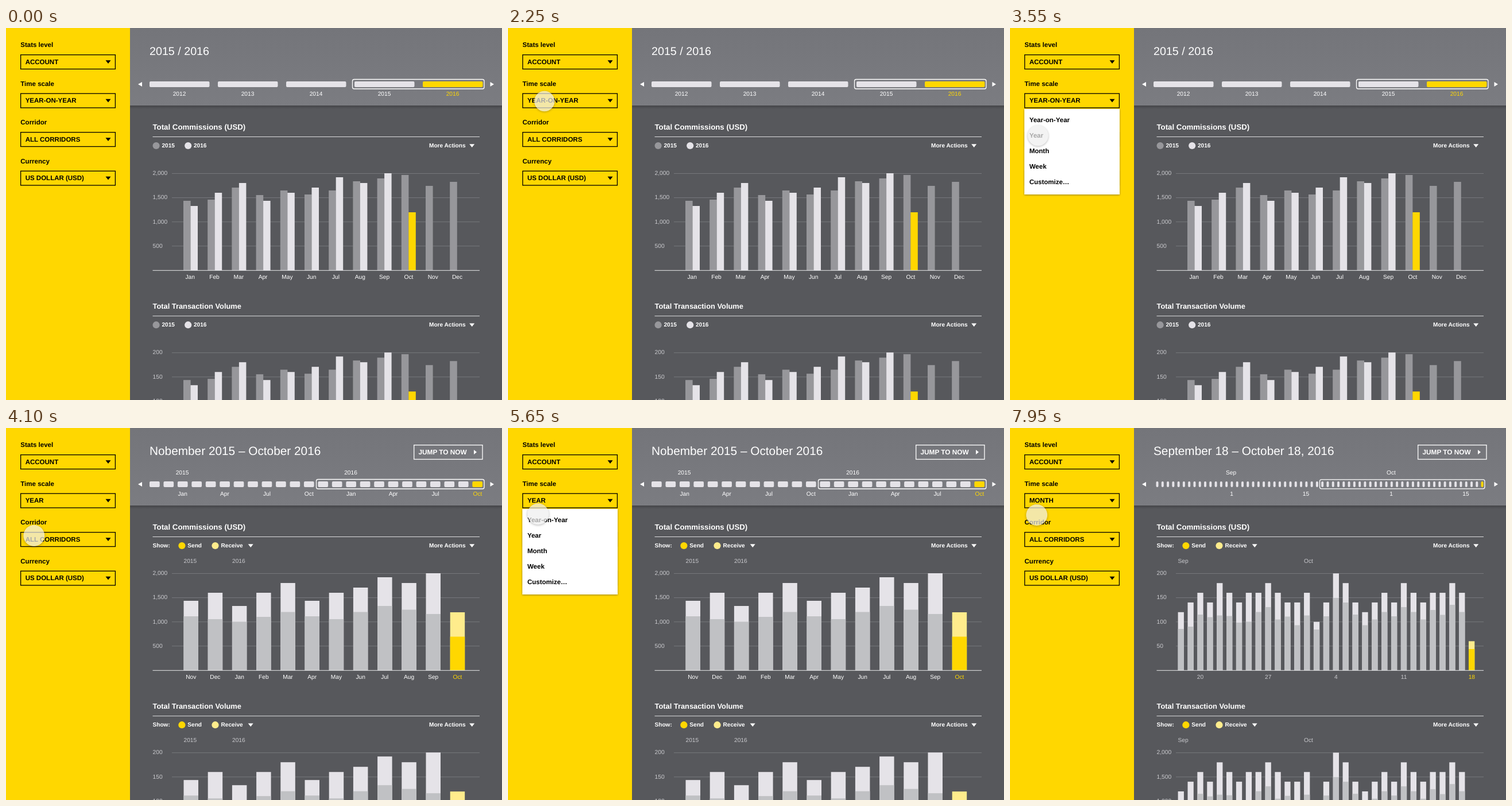
These frames come from a looping animation (864x648 px, 8 s). An HTML page:

```html
<!DOCTYPE html>
<html lang="en">
<head>
<meta charset="utf-8">
<title>Stats dashboard</title>
<style>
html, body { margin: 0; width: 100%; height: 100%; overflow: hidden; background: #57585c; }
svg { position: absolute; left: 0; top: 0; display: block; }
text { font-family: "Liberation Sans", Arial, sans-serif; text-rendering: geometricPrecision; white-space: pre; }
.b { font-weight: bold; }
#menu { position: absolute; left: 25px; top: 141px; width: 165.5px; height: 148.5px; background: #fff; box-shadow: 0 1px 3px rgba(0,0,0,.4); }
#dot { position: absolute; left: -18.5px; top: -18.5px; width: 37px; height: 37px; border-radius: 50%;
  background: rgba(238,238,238,.7); box-shadow: 0 1px 4px rgba(0,0,0,.3); }
</style>
</head>
<body>
<svg id="stage" width="864" height="648"></svg>
<div id="menu"><svg id="items" width="165" height="148"></svg></div>
<div id="dot"></div>
<script>
const YELLOW = '#ffd700', PALE = '#ffec8c', LIGHT = '#e5e3e8', MID = '#c0c1c4', GREY = '#97979b', WHITE = '#fff', DIM = '#c9c9cd';
const MONTHS = 'Jan Feb Mar Apr May Jun Jul Aug Sep Oct Nov Dec'.split(' ');
const $ = id => document.getElementById(id);
const range = (n, f) => Array.from({ length: n }, (_, i) => f(i)).join('');

const text = (x, y, s, size, fill, bold, anchor = 'start') =>
  `<text x="${x}" y="${y}" font-size="${size}" fill="${fill}" text-anchor="${anchor}"${bold ? ' class="b"' : ''}>${s}</text>`;
const bold = (x, y, s, size = 10.1, fill = WHITE) => text(x, y, s, size, fill, true);
const label = (x, y, s, fill = WHITE) => text(x, y, s, 10.2, fill, false, 'middle');
const rect = (x, y, w, h, fill, r = 0) => `<rect x="${x}" y="${y}" width="${w}" height="${h}" rx="${r}" fill="${fill}"/>`;
const frame = (x, y, w, h, color, r = 0) =>
  `<rect x="${x}" y="${y}" width="${w}" height="${h}" rx="${r}" fill="none" stroke="${color}" stroke-width="1.3"/>`;
const line = (x, y, color) => `<path d="M${x} ${y}H825" stroke="${color}"/>`;
const circle = (x, y, fill) => `<circle cx="${x}" cy="${y}" r="6.1" fill="${fill}"/>`;
const down = (x, y, fill = WHITE) => `<path d="M${x} ${y}h9l-4.5 5.8z" fill="${fill}"/>`;
const side = (x, y, w, h) => `<path d="M${x} ${y - h}v${2 * h}l${w} ${-h}z" fill="#fff"/>`;

// Bars standing on the axis at y = 422, given by their top edge
const bar = (x, w, top, fill) => rect(x, top, w, 422 - top, fill);

const timelines = [
  () => range(5, i => rect(250 + 119 * i, 93, 104.5, 10, i == 4 ? YELLOW : LIGHT, 2) +
      label(302 + 119 * i, 118, 2012 + i, i == 4 ? YELLOW : WHITE)) +
    frame(603.5, 89.5, 229.5, 16.5, WHITE, 3),
  () => range(24, i => rect(250 + 24.45 * i, 93, 17.7, 10, i == 23 ? YELLOW : LIGHT, 2)) +
    range(8, i => label(307.6 + 73.4 * i, 118, MONTHS[i * 3 % 12], i == 7 ? YELLOW : WHITE)) +
    label(307, 81, 2015) + label(600.5, 81, 2016) + frame(540.5, 89.5, 292.5, 16.5, WHITE, 3),
  () => range(62, i => rect(254.5 + 9.28 * i, 93, 4, 10, i == 61 ? YELLOW : LIGHT, 2)) +
    label(385, 81, 'Sep') + label(664, 81, 'Oct') +
    [386, 515.5, 664, 794].map((x, i) => label(x, 118, i % 2 ? 15 : 1)).join('') +
    frame(539.5, 89.8, 287.5, 16, WHITE, 3)
];

const older = [301, 299, 278, 291, 283, 290, 283, 267, 262, 256, 275, 268];
const newer = [310, 287, 270, 301, 287, 278, 260, 270, 253, 321];
const total = [301, 287, 310, 287, 270, 301, 287, 278, 260, 270, 253, 321];
const sent = [328, 333, 337.5, 329, 320.5, 328, 333, 320.5, 310, 316.5, 324, 363.5];
// Daily totals in units of 20
const days = [6, 7, 8, 7, 9, 8, 7, 8, 8, 9, 8, 7, 7, 8, 5, 7, 10, 9, 7, 6, 7, 8, 7, 9, 8, 7, 8, 8, 9, 8, 3];
const daySent = [350, 346, 325, 329.5, 326.5, 327.5, 339, 337.5, 320.5, 312, 333.5, 328.5, 343.5, 326.5, 351, 328,
  296, 304, 325, 343.5, 333.5, 320.5, 328, 312, 320.5, 333.5, 317, 325.5, 308, 320.5, 385];

const stacked = (x, w, top, split, last) => bar(x, w, top, last ? PALE : LIGHT) + bar(x, w, split, last ? YELLOW : MID);

const plots = [
  () => older.map((y, i) => bar(309 + 42.2 * i, 12.6, y, GREY)).join('') +
    newer.map((y, i) => bar(321.5 + 42.2 * i, 12.5, y, i == 9 ? YELLOW : LIGHT)).join('') +
    MONTHS.map((m, i) => label(320.7 + 42.3 * i, 437, m)).join(''),
  () => text(309.5, 235, 2015, 10.2, DIM) + text(394, 235, 2016, 10.2, DIM) +
    total.map((y, i) => stacked(309.5 + 42.2 * i, 25.5, y, sent[i], i == 11) +
      label(322.2 + 42.2 * i, 437, MONTHS[(i + 10) % 12], i == 11 ? YELLOW : WHITE)).join(''),
  () => text(292.5, 235, 'Sep', 10.2, DIM) + text(512, 235, 'Oct', 10.2, DIM) +
    days.map((v, i) => stacked(292.6 + 16.88 * i, 10.3, 422 - 16.87 * v, daySent[i], i == 30)).join('') +
    [20, 27, 4, 11, 18].map((d, i) => label(331.5 + 118.2 * i, 437, d, i == 4 ? YELLOW : DIM)).join('')
];

function chart(mode, name, max, dy, size) {
  const legend = mode
    ? bold(255.5, 208, 'Show:') + circle(306.4, 205, YELLOW) + bold(316.3, 208, 'Send') +
      circle(364.5, 205, PALE) + bold(374.5, 208, 'Receive') + down(421.7, 202.3)
    : circle(261.6, 205, GREY) + bold(271.5, 208, 2015) + circle(317.2, 205, LIGHT) + bold(327, 208, 2016);
  const grid = range(4, i => line(289, 253.5 + 42.1 * i, '#77787c') +
    text(255.5, 256.3 + 42.1 * i, (max * (4 - i) / 4).toLocaleString('en-US'), 10.3, DIM));
  return `<g transform="translate(0 ${dy})">` + bold(255.5, 177, name, size) + line(255.5, 189.5, '#dcdcde') + legend +
    bold(737, 208, 'More Actions') + down(807.2, 202.3) + grid + plots[mode]() + line(255.5, 422.3, '#e8e8ea') + '</g>';
}

function scene(mode) {
  const title = ['2015 / 2016', 'Nobember 2015 – October 2016', 'September 18 – October 18, 2016'][mode];
  const value = ['YEAR-ON-YEAR', 'YEAR', 'MONTH'][mode];
  const jump = mode ? frame(710.7, 29.7, 119.3, 24.8, WHITE) + bold(718.5, 45.8, 'JUMP TO NOW', 11.8) + side(815, 42, 5, 4) : '';
  return `<g id="view${mode}">` + text(250, 47, title, mode ? 20.8 : 19.7, WHITE) + jump + timelines[mode]() +
    chart(mode, 'Total Commissions (USD)', mode == 2 ? 200 : 2000, 0, 13.25) +
    chart(mode, 'Total Transaction Volume', mode == 2 ? 2000 : 200, 312.2, 12.85) +
    bold(33.7, 130, value, 11.5, '#000') + '</g>';
}

const fields = [['Stats level', 'ACCOUNT'], ['Time scale', ''], ['Corridor', 'ALL CORRIDORS'], ['Currency', 'US DOLLAR (USD)']];
$('stage').innerHTML =
  `<defs><linearGradient id="head" x2="0" y2="1"><stop stop-color="#74757a"/><stop offset="1" stop-color="#7b7c81"/></linearGradient>
   <linearGradient id="shade" x2="0" y2="1"><stop stop-opacity=".22"/><stop offset="1" stop-opacity="0"/></linearGradient></defs>` +
  rect(216, 0, 648, 648, '#57585c') + rect(216, 135, 648, 6, 'url(#shade)') + rect(216, 0, 648, 135, 'url(#head)') +
  rect(0, 0, 216, 648, YELLOW) + side(237, 98, -7, 4) + side(843.5, 98, 6.5, 4) +
  fields.map(([name, value], i) => {
    const y = 67.5 * i;
    return bold(25.3, 33 + y, name, 11.5, '#000') + frame(25.6, 46.7 + y, 164.8, 24.8, '#000') +
      bold(33.7, 62.5 + y, value, 11.5, '#000') + down(173.5, 56.2 + y, '#000');
  }).join('') + [0, 1, 2].map(scene).join('');
$('items').innerHTML = ['Year-on-Year', 'Year', 'Month', 'Week', 'Customize…']
  .map((s, i) => bold(8.7, 23 + 27 * i, s, 11.5, '#000')).join('');

// Quick start, long soft landing
function ease(t) {
  const curve = (s, a, b) => 3 * (1 - s) * (1 - s) * s * a + 3 * (1 - s) * s * s * b + s * s * s;
  let lo = 0, hi = 1;
  for (let i = 0; i < 20; i++) {
    const s = (lo + hi) / 2;
    if (curve(s, .16, .16) < t) lo = s; else hi = s;
  }
  return curve(lo, .16, 1);
}

// Pointer moves: start time, end point, sideways bow
const moves = [[1200, 63, 127, 0], [2500, 48.3, 187, 0], [4500, 49.8, 126.5, 0], [5550, 49, 213.5, 3], [7650, 45, 127, 0]];
const presses = [2050, 3350, 5130, 6250];

function draw(now) {
  const t = now % 8000;
  const mode = t < 3750 ? 0 : t < 6700 ? 1 : 2;
  for (let i = 0; i < 3; i++) $('view' + i).style.display = i == mode ? '' : 'none';
  $('menu').style.display = t >= 2350 && t < 3750 || t >= 5450 && t < 6700 ? '' : 'none';

  let x = -32, y = 224, scale = 1;
  for (const [start, tx, ty, bow] of moves) {
    if (t < start) break;
    const p = ease(Math.min(1, (t - start) / 850));
    x += (tx - x) * p + 4 * bow * p * (1 - p);
    y += (ty - y) * p;
  }
  for (const start of presses) {
    const p = (t - start) / 250;
    if (p > 0 && p < 1) scale -= .07 * Math.sin(Math.PI * p);
  }
  $('dot').style.transform = `translate(${x}px,${y}px) scale(${scale})`;
}

const began = performance.now();
function tick() {
  draw(performance.now() - began);
  requestAnimationFrame(tick);
}
tick();
</script>
</body>
</html>
```
